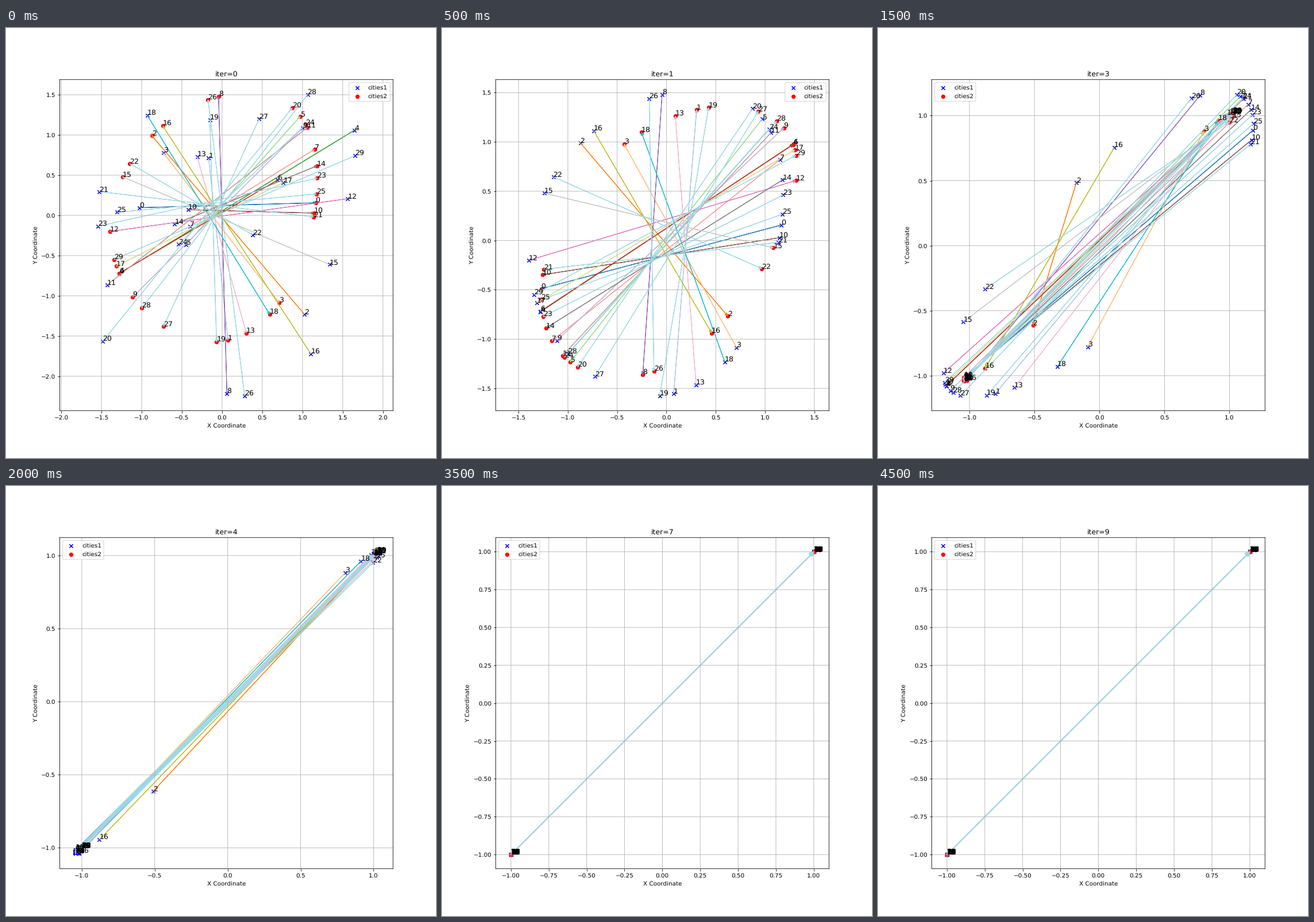
These frames come from a looping animation (748x748 px, 5000 ms). A matplotlib script:

```python
import numpy as np
import matplotlib.pyplot as plt
from matplotlib.animation import FuncAnimation

CITIES = 30
STEPS = 10
STEP_MS = 500


def standardize(p):
    return (p - p.mean(axis=0)) / p.std(axis=0)


def advance(p):
    """Average all cities, weighted by softmax of negative cosine similarity."""
    unit = p / np.linalg.norm(p, axis=1, keepdims=True)
    weights = np.exp(-unit @ unit.T)
    weights /= weights.sum(axis=1, keepdims=True)
    return standardize(weights @ p)


rng = np.random.RandomState(1234)
path = [standardize(rng.rand(CITIES, 2))]
for _ in range(STEPS):
    path.append(advance(path[-1]))

plt.rcParams.update({"font.family": "DejaVu Sans", "text.hinting": "none",
                     "path.snap": False})
fig, ax = plt.subplots(figsize=(10, 10), dpi=74.8)
colors = plt.get_cmap("tab20")


def draw(step):
    ax.clear()
    old, new = path[step], path[step + 1]
    ax.scatter(*old.T, c="blue", marker="x", label="cities1")
    ax.scatter(*new.T, c="red", marker="o", label="cities2")
    for i, (a, b) in enumerate(zip(old, new)):
        ax.arrow(*a, *(b - a), head_width=0.03, head_length=0.03,
                 length_includes_head=True, color=colors(i))
        for x, y in (a, b):
            ax.text(x, y, str(i), fontsize=12)
    ax.set_title(f"iter={step}")
    ax.set_xlabel("X Coordinate")
    ax.set_ylabel("Y Coordinate")
    ax.legend(loc="upper right" if step < 3 else "upper left")
    ax.grid(True)
    ax.axis("equal")
    return []


anim = FuncAnimation(fig, draw, frames=STEPS, interval=STEP_MS,
                     init_func=lambda: [], repeat=True, repeat_delay=0)
plt.show()
```
